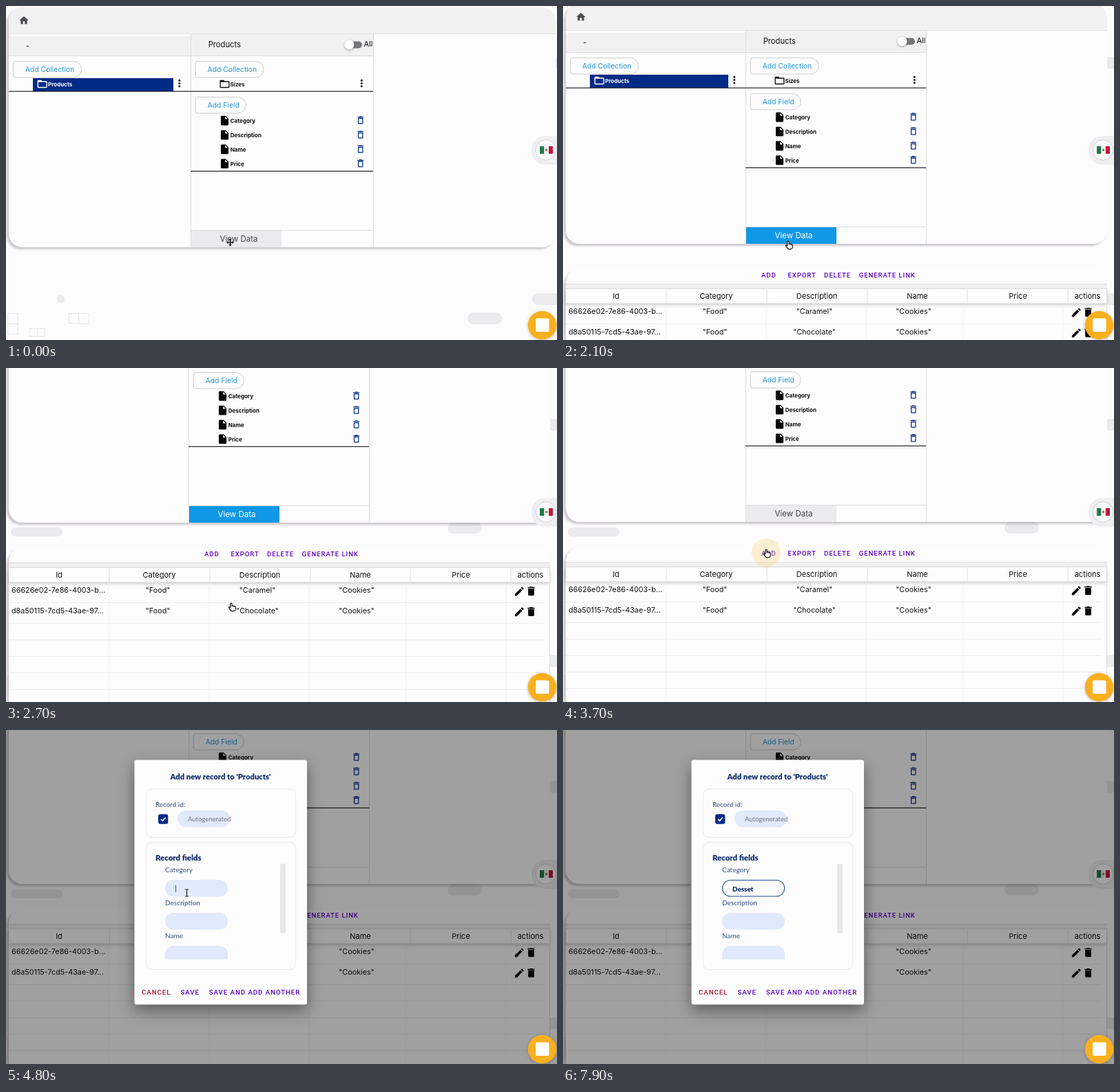
Animation of 800x486 px, one loop 8000 ms. Source, as an HTML page with a canvas:

```html
<!DOCTYPE html>
<html lang="en">
<head>
<meta charset="utf-8">
<title>Add a record</title>
<style>
html, body { margin: 0; width: 100%; height: 100%; overflow: hidden; background: #fdfcfd; }
canvas { display: block; width: 800px; height: 486px; }
</style>
</head>
<body>
<canvas id="stage" width="800" height="486"></canvas>
<script>
const stage = document.getElementById('stage');
const layer = document.createElement('canvas');
layer.width = stage.width;
layer.height = stage.height;
const page = stage.getContext('2d'), overlay = layer.getContext('2d');
let ctx = page;

const LOOP = 8000, STEP = 100;
const UI = 'Inter, sans-serif', FORM = 'Lato, sans-serif', CAPS = 'Roboto, sans-serif';
const PAPER = '#fefdfe', BAR = '#f2f1f2', RULE = '#dcdbdd', DECO = '#ebeaec';
const NAVY = '#002b87', BLUE = '#0f98e6', LINK = '#2196d8', PURPLE = '#5a00c8', INK = '#111';

const icons = {
  home: 'M10 20v-6h4v6h5v-8h3L12 3 2 12h3v8z',
  folder: 'M20 6h-8l-2-2H4c-1.1 0-2 .9-2 2v12c0 1.1.9 2 2 2h16c1.1 0 2-.9 2-2V8c0-1.1-.9-2-2-2zm0 12H4V8h16v10z',
  file: 'M6 2c-1.1 0-2 .9-2 2v16c0 1.1.9 2 2 2h12c1.1 0 2-.9 2-2V8l-6-6H6zm7 7V3.5L18.5 9H13z',
  bin: 'M6 19c0 1.1.9 2 2 2h8c1.1 0 2-.9 2-2V7H6v12zM8 9h8v10H8V9zm7.5-5l-1-1h-5l-1 1H5v2h14V4z',
  trash: 'M6 19c0 1.1.9 2 2 2h8c1.1 0 2-.9 2-2V7H6v12zM19 4h-3.5l-1-1h-5l-1 1H5v2h14V4z',
  pencil: 'M3 17.2V21h3.8L17.8 9.9l-3.7-3.7L3 17.2zM20.7 7c.4-.4.4-1 0-1.4l-2.3-2.3c-.4-.4-1-.4-1.4 0l-1.9 1.8 3.8 3.8z',
  hand: 'M8 13V4c0-2.6 4-2.6 4 0v5c1-1 3-.8 3.5.6 1-.8 2.7-.5 3 .8 1.2-.6 2.5.1 2.5 1.6v4c0 4-2 6-6 6h-2c-3 0-4-1.5-5-3l-3.5-5c-1-2 1.5-3.5 3.5-1z'
};
for (const k in icons) icons[k] = new Path2D(icons[k]);

const clamp = (v, a = 0, b = 1) => Math.min(b, Math.max(a, v));
const mix = (a, b, p) => a + (b - a) * p;
const smooth = p => p * p * (3 - 2 * p);
const span = (t, from, len) => clamp((t - from) / len);

function text(s, x, y, size, color = INK, { font = UI, weight = 400, align = 'left', gap = 0 } = {}) {
  ctx.font = `${weight} ${size}px ${font}`;
  ctx.letterSpacing = gap + 'px';
  ctx.textAlign = align;
  ctx.textBaseline = 'alphabetic';
  ctx.fillStyle = color;
  ctx.fillText(s, x, y + size * 0.36);
}

function rect(x, y, w, h, color) {
  ctx.fillStyle = color;
  ctx.fillRect(x, y, w, h);
}

function round(x, y, w, h, r, fill, stroke, width = 1) {
  ctx.beginPath();
  ctx.roundRect(x, y, w, h, r);
  if (fill) { ctx.fillStyle = fill; ctx.fill(); }
  if (stroke) { ctx.strokeStyle = stroke; ctx.lineWidth = width; ctx.stroke(); }
}

function disc(x, y, r, fill, stroke) {
  round(x - r, y - r, 2 * r, 2 * r, r, fill, stroke);
}

function shadowed(color, blur, dx, dy, draw) {
  ctx.save();
  ctx.shadowColor = color;
  ctx.shadowBlur = blur;
  ctx.shadowOffsetX = dx;
  ctx.shadowOffsetY = dy;
  draw();
  ctx.restore();
}

function card(x, y, w, h) {
  shadowed('rgba(60,55,65,.26)', 3, -3, 3, () => round(x, y, w, h, 20, PAPER));
}

function icon(name, cx, cy, size, fill, stroke) {
  ctx.save();
  ctx.translate(cx - size / 2, cy - size / 2);
  ctx.scale(size / 24, size / 24);
  ctx.fillStyle = fill;
  ctx.fill(icons[name]);
  if (stroke) { ctx.strokeStyle = stroke; ctx.lineWidth = 2; ctx.stroke(icons[name]); }
  ctx.restore();
}

function dots(x, y) {
  for (const d of [-4.3, 0, 4.3]) disc(x, y + d, 1.5, INK);
}

function pillButton(label, x, y, w) {
  round(x + .5, y + .5, w, 23.5, [3, 12, 12, 3], PAPER, '#cccbcd', 1);
  text(label, x + 18, y + 12.5, 10.3, LINK);
}

function backdropShapes() {
  rect(0, 0, 800, 486, '#fdfcfd');
  round(764, 418, 50, 17, 8.5, DECO);
  round(670, 446, 50, 17, 8.5, DECO);
  round(7, 232, 75, 13, 6.5, DECO);
  round(641, 224, 50, 17, 8.5, DECO);
  round(789, 74, 20, 17, 2, DECO);
  disc(79.5, 426.5, 5.7, DECO);
  ctx.strokeStyle = '#e6e5e7';
  ctx.lineWidth = 1;
  const boxes = [[2.5, 447.5, 15], [2.5, 462.5, 15], [91.5, 447.5, 14], [105.5, 447.5, 15], [34.5, 469.5, 11], [45.5, 469.5, 11]];
  for (const [x, y, s] of boxes) ctx.strokeRect(x, y, s, s);
}

function collections(wide, active) {
  const a = wide ? 268 : 265, b = wide ? 533 : 527, right = wide ? 798 : 790;
  card(4, 2, right - 4, 349);
  round(4, 2, right - 4, 38, [20, 20, 0, 0], BAR);
  rect(4, 40, right - 4, 1, '#e2e1e3');
  icon('home', 26, 21, 16, '#4c4a4e');

  rect(4, 44, a - 4, 28, BAR);
  rect(a, 41, b - a, 31, BAR);
  rect(4, 72, b - 4, 1, RULE);
  rect(a, 41, 1, 310, RULE);
  rect(b, 41, 1, 310, RULE);

  text('-', 29, 58, 11);
  pillButton('Add Collection', 10, 80, 99);
  rect(39, 105, a - 64, 19, NAVY);
  icon('folder', 52.7, 113.5, 17, '#fff');
  text('Products', 61, 114, 8, '#fff', { weight: 700 });
  dots(a - 16.2, 112.5);
  rect(4, 123.6, b - 4, 1.2, '#242326');

  text('Products', a + 25.7, 56, 11.2);
  round(b - 36, 51.5, 20, 10, 5, '#777579');
  shadowed('rgba(0,0,0,.4)', 3, 0, 1, () => disc(b - 34.5, 56.5, 7, '#fff'));
  text('All', b - 13.5, 55, 11);

  pillButton('Add Collection', a + 6.7, 80, 99);
  icon('folder', a + 49.5, 113.5, 17, INK);
  text('Sizes', a + 57.5, 114, 8, INK, { weight: 700 });
  dots(b - 16.7, 112.5);

  pillButton('Add Field', a + 6.7, 132, 73);
  ['Category', 'Description', 'Name', 'Price'].forEach((name, i) => {
    const y = 166.7 + i * 20.9;
    icon('file', a + 49.5, y, 16.7, '#050505');
    text(name, a + 57.7, y + .3, 8, INK, { weight: 700 });
    icon('bin', b - 18.3, y - .5, 15, NAVY);
  });
  rect(a, 239.8, b - a, 1.2, '#242326');

  rect(a, 326, b - a, 1, RULE);
  rect(a + 1, 327, 131, 24, active ? BLUE : '#ebeaec');
  text('View Data', a + 70, 339, 11.5, active ? '#fff' : '#454347', { align: 'center' });
}

function table() {
  card(4, 388, 786, 420);
  const caps = { font: CAPS, weight: 500, gap: .9 };
  [['ADD', 288], ['EXPORT', 326.5], ['DELETE', 379], ['GENERATE LINK', 429.7]].forEach(([s, x]) => text(s, x, 396.5, 9.6, PURPLE, caps));

  const heads = [['Id', 77], ['Category', 222.5], ['Description', 368.5], ['Name', 514.5], ['Price', 660.5], ['actions', 761.5]];
  rect(4, 409, 786, 8, BAR);
  rect(4, 409, 786, 1, '#dddcde');
  shadowed('rgba(0,0,0,.2)', 5, 0, 2, () => rect(4, 417, 785, 20.5, PAPER));
  rect(4, 416, 786, 1, '#dddcde');
  for (const [s, x] of heads) text(s, x, 427.3, 11, INK, { align: 'center' });
  for (const x of [150, 296, 442, 587, 733]) rect(x - .5, 417, 1, 20.5, '#dfdee0');

  for (const x of [149, 295, 440.5, 581, 726]) rect(x - .5, 440, 1, 370, '#f3f2f4');
  for (let i = 0; i < 12; i++) rect(4, i < 2 ? 467 + i * 30 : 497 + (i - 1) * 24, 778, 1, '#eeedef');
  rect(789, 417, 1, 390, '#dddcde');

  const rows = [['66626e02-7e86-4003-b...', '"Caramel"'], ['d8a50115-7cd5-43ae-97...', '"Chocolate"']];
  rows.forEach(([id, kind], i) => {
    const y = 449 + i * 29.8;
    text(id, 8, y, 10.8);
    [['"Food"', 220.5], [kind, 365], ['"Cookies"', 509]].forEach(([s, x]) => text(s, x, y, 10.8, INK, { align: 'center' }));
    icon('pencil', 745.3, y + 2, 17, '#050505');
    icon('trash', 762.5, y + 1.7, 17.5, '#050505');
  });
}

function flagTab() {
  round(763, 189, 60, 42, 20, '#efeef0');
  disc(784, 209.5, 14.7, PAPER, '#d2d1d3');
  rect(775, 204, 6.5, 11, '#1f7a4b');
  rect(781.5, 204, 6.5, 11, '#f4f2f2');
  rect(788, 204, 6, 11, '#c4173a');
  disc(784.6, 209.5, 1.7, '#8a7f5c');
}

function chatButton() {
  shadowed('rgba(0,0,0,.25)', 5, 0, 1, () => disc(778.5, 464.5, 20.7, '#f9b01f'));
  round(769, 454.5, 19.5, 19.5, 2, '#fff');
}

function input(y, h, typed) {
  if (typed) round(231.6, y + .5, 90, h - 1, 12, PAPER, '#1f4c9c', 1.1);
  else round(231, y, 91, h, h < 24 ? [12, 12, 0, 0] : 12, '#e1eafc');
}

function dialog(t, p) {
  const form = { font: FORM }, bold = { font: FORM, weight: 900 };
  const slate = '#34507f', deep = '#0b2a6b';
  shadowed(`rgba(0,0,0,${.42 * p})`, 22, 0, 9, () => round(186.5, 43.5, 250.5, 356, 3, PAPER));

  text("Add new record to 'Products'", 311.5, 67.5, 11.2, deep, { ...bold, align: 'center' });
  round(203.5, 86, 217, 70, 8, null, '#efeef1', 1.3);
  text('Record id:', 217, 108.5, 9.9, slate, form);
  round(221, 122.5, 14.3, 14.3, 3, NAVY);
  ctx.beginPath();
  ctx.moveTo(225, 129.7);
  ctx.lineTo(227.3, 132);
  ctx.lineTo(231.7, 127.4);
  ctx.strokeStyle = '#fff';
  ctx.lineWidth = 1.6;
  ctx.stroke();
  round(249, 117, 76, 24.5, 12, '#e1eafc');
  text('Autogenerated', 264, 129.5, 9.5, '#717480', form);

  round(203.5, 163.5, 217, 185, 8, null, '#efeef1', 1.3);
  text('Record fields', 217, 186, 11.4, deep, bold);
  const typed = 'Desset'.slice(0, [5600, 5900, 6200, 6600, 6900, 7400].filter(at => t >= at).length);
  ['Category', 'Description', 'Name'].forEach((name, i) => {
    text(name, 231, 203 + i * 48, 10, slate, form);
    input(218 + i * 48, i < 2 ? 24.5 : 20, i === 0 && typed);
  });
  text(typed, 246, 231, 9.8, deep, bold);
  if (t >= 4700 && t < 5600 && t % 1000 >= 500) rect(246, 225.5, 1, 10.5, '#555a66');
  round(398, 194.5, 8, 101.5, 3, '#e7e6e9');

  const caps = { font: CAPS, weight: 500, gap: .95 };
  text('CANCEL', 197, 381.5, 9.7, '#a3122c', caps);
  text('SAVE', 253.5, 381.5, 9.7, PURPLE, caps);
  text('SAVE AND ADD ANOTHER', 294.7, 381.5, 9.7, PURPLE, caps);
}

// The dialog fades as one piece, so it is composed on its own layer.
function showDialog(t, p) {
  const k = mix(.8, 1, 1 - (1 - p) ** 2);
  ctx = overlay;
  ctx.clearRect(0, 0, 800, 486);
  ctx.save();
  ctx.translate(312.5, 221.5);
  ctx.scale(k, k);
  ctx.translate(-312.5, -221.5);
  dialog(t, p);
  ctx.restore();
  ctx = page;
  ctx.globalAlpha = Math.min(1, .17 + p);
  ctx.drawImage(layer, 0, 0);
  ctx.globalAlpha = 1;
}

function halo(x, y) {
  disc(x, y, 21.5, 'rgba(248,215,130,.3)');
  ctx.save();
  ctx.setLineDash([1, 1.5]);
  for (let r = 6; r < 21; r += 3) disc(x, y, r, null, 'rgba(235,195,105,.4)');
  ctx.restore();
}

function strokes(lines, color, width) {
  ctx.beginPath();
  for (const [x1, y1, x2, y2] of lines) { ctx.moveTo(x1, y1); ctx.lineTo(x2, y2); }
  ctx.strokeStyle = color;
  ctx.lineWidth = width;
  ctx.stroke();
}

function moveCross(x, y) {
  const cross = [[x - 4, y, x + 4, y], [x, y - 4, x, y + 4]];
  strokes(cross, '#fff', 3.5);
  strokes(cross, INK, 1.5);
  for (let i = 0; i < 4; i++) {
    ctx.save();
    ctx.translate(x, y);
    ctx.rotate(i * Math.PI / 2);
    ctx.beginPath();
    ctx.moveTo(0, -5.5);
    ctx.lineTo(2.3, -3);
    ctx.lineTo(-2.3, -3);
    ctx.fillStyle = INK;
    ctx.fill();
    ctx.restore();
  }
}

function textBeam(x, y) {
  const beam = [[x, y - 4.5, x, y + 4.5], [x - 2.5, y - 5, x + 2.5, y - 5], [x - 2.5, y + 5, x + 2.5, y + 5]];
  strokes(beam, '#fff', 2.6);
  strokes(beam, INK, 1.2);
}

function cursor(t) {
  if (t >= 5600) return;
  const toAdd = smooth(span(t, 2800, 700)), toField = smooth(span(t, 4100, 400));
  const x = mix(mix(328, 296, toAdd), 262.5, toField);
  const y = mix(mix(348, 270, toAdd), 237, toField);
  const clicking = t >= 600 && t < 1500 || t >= 3700 && t < 4200 || t >= 4500 && t < 4700;
  if (clicking) halo(x - 1, y - (t < 1500 ? 5 : 1));

  if (t < 600) moveCross(325.5, 344);
  else if (t < 3900) icon('hand', x, y, 14, '#fff', INK);
  else textBeam(x, y);
}

function draw(t) {
  const wide = t < 1000;
  const scroll = Math.round(127 * smooth(span(t, 2010, 720)));
  const open = span(t, 3950, 150);

  backdropShapes();
  ctx.save();
  ctx.translate(0, -scroll);
  collections(wide, t >= 700 && t < 3700);
  if (!wide) table();
  ctx.restore();
  flagTab();

  if (open > 0) {
    rect(0, 0, 800, 486, `rgba(0,0,0,${.37 * open ** 1.35})`);
    showDialog(t, open);
  }
  chatButton();
  cursor(t);
}

function frame(now) {
  draw(Math.floor((now % LOOP) / STEP) * STEP);
  requestAnimationFrame(frame);
}
draw(0);
requestAnimationFrame(frame);
</script>
</body>
</html>
```
